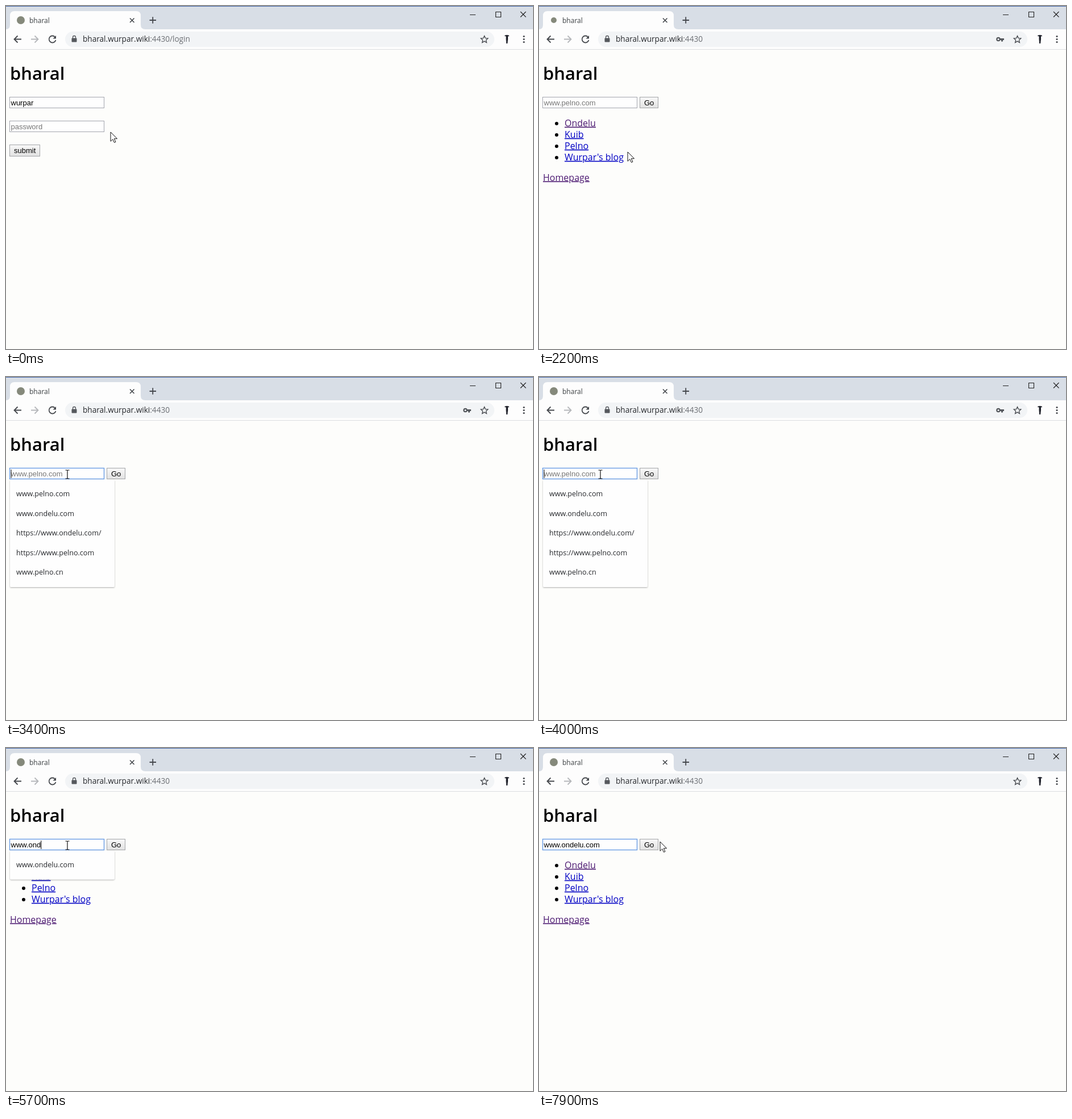
An HTML page that plays this animation: 927x604 px, repeating every 8000 ms.

```html
<!DOCTYPE html>
<html lang="en">
<head>
<meta charset="utf-8">
<title>bharal</title>
<style>
  html, body { margin: 0; width: 100%; height: 100%; overflow: hidden; background: #fdfdfb; }
  svg { display: block; width: 100%; height: 100%; }
  text { font-family: "Open Sans", "Noto Sans", sans-serif; white-space: pre; }
  .form { font: 13px "Liberation Sans", Arial, sans-serif; }
  .box { fill: #fefefe; stroke: #a3a5ae; }
  .focus { stroke: #6a9de4; stroke-width: 1.4; }
  .page { font-size: 16px; }
  .link { fill: #0000c4; text-decoration: underline; }
  .visited { fill: #4d1a72; }
  .hint { fill: #777; }
  .line { fill: none; stroke: #45484d; stroke-width: 1.8; }
</style>
</head>
<body>
<svg viewBox="0 0 927 604" preserveAspectRatio="none">
  <defs>
    <linearGradient id="face" x2="0" y2="1">
      <stop stop-color="#f8f8f8"/><stop offset="1" stop-color="#e2e2e2"/>
    </linearGradient>
    <filter id="shadow" x="-10%" y="-10%" width="120%" height="130%">
      <feDropShadow dx="0" dy="1" stdDeviation="1" flood-color="#444" flood-opacity=".45"/>
    </filter>
  </defs>

  <!-- window frame -->
  <rect width="927" height="41" fill="#d8dee6"/>
  <rect width="927" height="1" fill="#4668a8"/>
  <path d="M0 41Q7 41 7 33V17Q7 9 15 9H229Q237 9 237 17V33Q237 41 245 41Z" fill="#fdfdfd"/>
  <circle id="favicon" cx="26" cy="25" fill="#85897b"/>
  <text x="41" y="30" font-size="12" fill="#3c4043">bharal</text>
  <g class="line">
    <path d="M218 21.500l7.500 7.500m0-7.500l-7.500 7.500" stroke-width="1.600"/>
    <path d="M252.500 25h11.500M258.200 19.200v11.500"/>
    <path d="M816 15.500h10M861.500 10.500h9v9h-9ZM905 10l9.500 9.500m0-9.500l-9.500 9.500" stroke="#222" stroke-width="1.100"/>
  </g>

  <!-- toolbar -->
  <rect y="41" width="927" height="35" fill="#fdfdfd"/>
  <path d="M0 76.500H927" stroke="#dcdde0"/>
  <rect x="104" y="45" width="755" height="27" rx="13.500" fill="#f2f4f6"/>
  <g class="line">
    <path d="M27 58.500H14.500M20.500 52.500l-6 6 6 6"/>
    <path d="M44 58.500h12.500M50.500 52.500l6 6-6 6" stroke="#b6b8bb"/>
    <path d="M86 54.300A6 6 0 1 0 87.500 60"/>
    <path d="M117.500 57v-2a2.500 2.500 0 0 1 5 0v2" stroke="#55585d" stroke-width="1.300"/>
    <path d="M841.500 52.500l1.800 4.100 4.500.4-3.400 3 1 4.400-3.900-2.300-3.900 2.300 1-4.400-3.400-3 4.500-.4Z" stroke-width="1.300"/>
  </g>
  <path d="M88 52v5.500h-5.500Z" fill="#45484d"/>
  <rect x="115.500" y="56.500" width="9" height="7" rx="1" fill="#55585d"/>
  <g id="key" fill="#55585d">
    <path d="M810 57h8v3h-2v2.500h-3V60h-3Z"/>
    <circle cx="808" cy="58.500" r="2.700" fill="none" stroke="#55585d" stroke-width="2.200"/>
  </g>
  <path d="M876.500 52.500q4-2.500 8.500-.5v1.200h-2v5.300l-.9 7.500h-2l-.6-7.500v-5Z" fill="#20222b"/>
  <g fill="#45484d">
    <circle cx="911" cy="53.500" r="1.600"/><circle cx="911" cy="58.500" r="1.600"/><circle cx="911" cy="63.500" r="1.600"/>
  </g>
  <text x="135" y="63" font-size="13.600" fill="#26282c">bharal.wurpar.wiki<tspan id="path" fill="#6b6e73"></tspan></text>

  <!-- page -->
  <text x="7" y="130" font-size="31" font-weight="600">bharal</text>
  <rect id="topBox" class="box" x="6.500" y="160.500" width="166" height="19"/>
  <text id="topText" class="form" x="8.500" y="174.500"></text>

  <g id="login">
    <rect id="passBox" class="box" x="6.500" y="202.500" width="166" height="19"/>
    <text id="passText" class="form" x="8.500" y="216.500"></text>
    <rect x="6.500" y="244.500" width="53" height="20" fill="url(#face)" stroke="#a3a5a8"/>
    <text class="form" x="14" y="259">submit</text>
  </g>

  <g id="home">
    <rect x="177.500" y="160.500" width="32" height="19" fill="url(#face)" stroke="#a3a5a8"/>
    <text class="form" x="185" y="174.500">Go</text>
    <g id="links" class="page"></g>
    <text class="page link visited" x="7" y="307.500">Homepage</text>
    <g id="menu">
      <rect id="menuBox" x="7" y="181" width="184" rx="2" fill="#fefefe" filter="url(#shadow)"/>
      <g id="menuItems" font-size="12.600" fill="#26282c"></g>
    </g>
  </g>

  <rect id="caret" width="1" height="15"/>
  <path id="arrow" d="M0 0V16.300L3.800 12.700L6.500 18.500L8.900 17.400L6.300 11.700H11.500Z" fill="#fff" stroke="#111"/>
  <path id="beam" d="M-3.500-7.500H-1L0-6.800L1-7.500H3.500M0-7V7M-3.500 7.500H-1L0 6.800L1 7.500H3.500" fill="none" stroke="#111" stroke-width="1.200"/>
</svg>
<script>
const LOOP = 8000, STEP = 100;
const HOME_AT = 1900, PASS_FOCUS = 500, URL_FOCUS = 3000;
const ADDRESS = "www.ondelu.com";
const passKeys = Array.from({ length: 13 }, (_, i) => 600 + i * 50);
const urlKeys = [4100, 4300, 4500, 4800, 5200, 5450, 5700, 5950, 6150, 6350, 6600, 6800, 6900, 7000];
const suggestions = ["www.pelno.com", ADDRESS, "https://www.ondelu.com/", "https://www.pelno.com", "www.pelno.cn"];

// time, x, y of the pointer
const route = [
  [0, 184, 222], [450, 118, 217.5], [1350, 118, 217.5], [1700, 38, 254],
  [1900, 38, 254], [2200, 156, 257], [2350, 156, 257], [2800, 108, 171.5],
  [7300, 108, 171.5], [7800, 213, 165], [LOOP, 213, 165]
];

const el = Object.fromEntries([...document.querySelectorAll("[id]")].map(e => [e.id, e]));
const show = (node, on) => node.setAttribute("display", on ? "inline" : "none");
const typed = (keys, t) => keys.filter(k => k <= t).length;

function add(parent, tag, attrs, content = "") {
  const node = document.createElementNS("http://www.w3.org/2000/svg", tag);
  for (const [name, value] of Object.entries(attrs)) node.setAttribute(name, value);
  node.textContent = content;
  parent.append(node);
}

["Ondelu", "Kuib", "Pelno", "Wurpar's blog"].forEach((name, i) => {
  const y = 211.7 + i * 20;
  add(el.links, "circle", { cx: 31, cy: y - 4.7, r: 3 });
  add(el.links, "text", { x: 45, y, class: i ? "link" : "link visited" }, name);
});

function setField(node, value, placeholder) {
  node.textContent = value || placeholder;
  node.classList.toggle("hint", !value);
}

function pointerAt(t) {
  const i = route.findIndex(p => p[0] > t);
  const [t0, x0, y0] = route[i - 1], [t1, x1, y1] = route[i];
  const u = (t - t0) / (t1 - t0), e = u * u * (3 - 2 * u);
  return [x0 + (x1 - x0) * e, y0 + (y1 - y0) * e];
}

function drawPointer(t, home) {
  const [x, y] = pointerAt(t);
  const over = top => x > 6 && x < 173 && y > top && y < top + 20;
  const text = over(160) || (!home && over(202));
  show(el.beam, text);
  show(el.arrow, !text);
  (text ? el.beam : el.arrow).setAttribute("transform", `translate(${x} ${y})`);
}

function drawCaret(t, focusAt, keys, node, value, top) {
  const lastEdit = Math.max(focusAt, ...keys.filter(k => k <= t));
  show(el.caret, t >= focusAt && (t - lastEdit) % 1000 < 500);
  el.caret.setAttribute("x", 8.5 + (value ? node.getComputedTextLength() : 0));
  el.caret.setAttribute("y", top);
}

function drawMenu(t, value) {
  const open = t >= URL_FOCUS && value !== ADDRESS;
  show(el.menu, open);
  if (!open) return;
  const items = suggestions.filter(s => s.startsWith(value));
  el.menuBox.setAttribute("height", 16 + 34.6 * items.length);
  el.menuItems.replaceChildren();
  items.forEach((s, i) => add(el.menuItems, "text", { x: 18, y: 210 + 34.6 * i }, s));
}

function draw(t) {
  const home = t >= HOME_AT;
  const password = "•".repeat(typed(passKeys, t));
  const address = ADDRESS.slice(0, typed(urlKeys, t));

  show(el.login, !home);
  show(el.home, home);
  show(el.key, password && !address);
  el.path.textContent = home ? ":4430" : ":4430/login";
  el.favicon.setAttribute("r", home && t < 2400 ? 5 : 7);
  el.topBox.classList.toggle("focus", t >= URL_FOCUS);
  el.passBox.classList.toggle("focus", t >= PASS_FOCUS);
  setField(el.topText, home ? address : "wurpar", "www.pelno.com");
  setField(el.passText, password, "password");

  if (home) drawCaret(t, URL_FOCUS, urlKeys, el.topText, address, 163);
  else drawCaret(t, PASS_FOCUS, passKeys, el.passText, password, 205);
  drawMenu(t, address);
  drawPointer(t, home);
}

function tick() {
  draw(Math.floor(performance.now() % LOOP / STEP) * STEP);
  requestAnimationFrame(tick);
}
tick();
</script>
</body>
</html>
```
